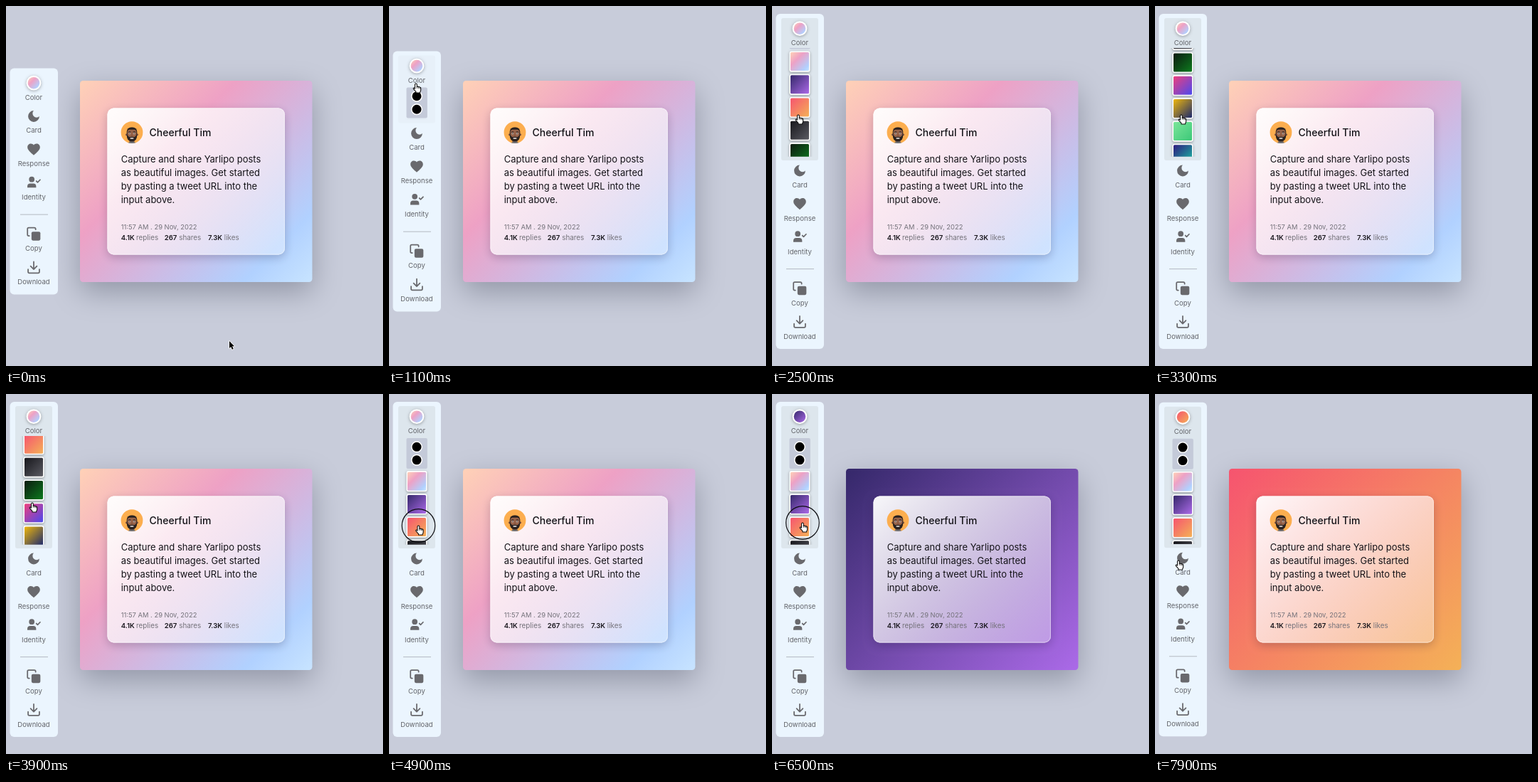
Recreate the animation shown at these times as an HTML page with a canvas. Size 530 by 506 pixels, loop 8 s.

```html
<!DOCTYPE html>
<html lang="en">
<head>
<meta charset="utf-8">
<title>Post card colour picker</title>
<style>
html, body { margin: 0; width: 100%; height: 100%; overflow: hidden; background: #c8ccda; }
canvas { display: block; width: 530px; height: 506px; }
</style>
</head>
<body>
<canvas id="stage"></canvas>
<script>
const W = 530, H = 506, LOOP = 8000, STEP = 100;
const canvas = document.getElementById('stage');
const ctx = canvas.getContext('2d');
const dpr = window.devicePixelRatio || 1;
canvas.width = W * dpr;
canvas.height = H * dpr;

const FONT = 'Inter, "Open Sans", sans-serif';
const ICON = '#69696d';
const PINK = ['#ffd1b7', 0, '#eea1c5', 0.36, '#b1d1ff', 0.84, '#c8e4ff', 1];
const PURPLE = ['#35286a', 0, '#ab6ae8', 1];
const ORANGE = ['#f6546f', 0, '#f4b157', 1];
const SWATCHES = [
  PINK, PURPLE, ORANGE,
  ['#17171c', 0, '#5a5a62', 1],
  ['#0c1a10', 0, '#0d7a1e', 1],
  ['#ee3f7c', 0, '#4b49ee', 1],
  ['#efb70c', 0, '#1d2a6c', 1],
  ['#7be59a', 0, '#3cc878', 1],
  ['#2f1a80', 0, '#19bfa2', 1],
  ['#f7d54a', 0, '#ef6b3a', 1]
];

// Pointer keys: time, x, y
const POINTER = [
  [0, 314, 471], [400, 38, 196], [550, 38, 196], [950, 38, 108], [1400, 38, 112],
  [1800, 37, 153], [4200, 37, 153], [4750, 41.5, 185], [5000, 41.5, 185],
  [5500, 40, 158], [5900, 40, 158], [6350, 43, 181], [6950, 43, 181],
  [7300, 36, 146], [7450, 36, 146], [7900, 33, 234]
];
const SCROLL = [[2100, 0], [3300, 172], [3500, 192], [3600, 192], [4300, 0]];
const CLICKS = [[4800, 5000], [5700, 5900], [6400, 6600]];

const paths = {
  moon: new Path2D('M12 3a6 6 0 0 0 9 9 9 9 0 1 1-9-9Z'),
  heart: new Path2D('M12 21.3L10.5 20C5.4 15.4 2 12.3 2 8.5 2 5.4 4.4 3 7.5 3c1.7 0 3.4.8 4.5 2.1C13.1 3.8 14.8 3 16.5 3 19.6 3 22 5.4 22 8.5c0 3.8-3.4 6.9-8.5 11.5Z'),
  bust: new Path2D('M4.4 6.8a4.4 4.4 0 1 1 8.8 0a4.4 4.4 0 1 1-8.8 0ZM1.8 20v-2a4.6 4.6 0 0 1 4.6-4.6h4.8a4.6 4.6 0 0 1 4.6 4.6v2Z'),
  check: new Path2D('M16.2 9.4l2 2 4-4'),
  copyBack: new Path2D('M5 15H4a2 2 0 0 1-2-2V4a2 2 0 0 1 2-2h9a2 2 0 0 1 2 2v1'),
  download: new Path2D('M21 15v4a2 2 0 0 1-2 2H5a2 2 0 0 1-2-2v-4M7 10l5 5 5-5M12 15V3'),
  arrow: new Path2D('M0 0V10L2.2 7.9L3.9 11.8L5.7 11L4.1 7.2H7.1Z'),
  hand: new Path2D('M-1.5 1Q0-1 1.3 1V4.6Q2.6 3.6 3.6 4.8Q4.8 4 5.3 5.2Q6.6 5 6.7 6.4V9Q6.5 11 5.6 12V13H0V11.6L-3.6 7.6Q-4.2 5.8-2.6 6.2L-1.5 7.2Z')
};

// Cubic bezier (.25, .1, .25, 1)
function ease(x) {
  if (x <= 0) return 0;
  if (x >= 1) return 1;
  let lo = 0, hi = 1;
  for (let i = 0; i < 24; i++) {
    const m = (lo + hi) / 2;
    if (0.75 * m * (1 - m) + m ** 3 < x) lo = m; else hi = m;
  }
  return 0.3 * lo * (1 - lo) ** 2 + 3 * lo * lo * (1 - lo) + lo ** 3;
}

function along(keys, t) {
  if (t <= keys[0][0]) return keys[0].slice(1);
  for (let i = 1; i < keys.length; i++) {
    const [a, ...from] = keys[i - 1], [b, ...to] = keys[i];
    if (t > b) continue;
    const u = (t - a) / (b - a), s = u * u * (3 - 2 * u);
    return from.map((v, n) => v + (to[n] - v) * s);
  }
  return keys[keys.length - 1].slice(1);
}

function box(x, y, w, h, r) {
  ctx.beginPath();
  ctx.roundRect(x, y, w, h, r);
}

function circle(x, y, r, fill) {
  ctx.beginPath();
  ctx.arc(x, y, r, 0, Math.PI * 2);
  ctx.fillStyle = fill;
  ctx.fill();
}

// Diagonal gradient at 135 degrees over a box
function diagonal(x, y, w, h, stops) {
  const cx = x + w / 2, cy = y + h / 2, d = (w + h) / 4;
  const g = ctx.createLinearGradient(cx - d, cy - d, cx + d, cy + d);
  for (let i = 0; i < stops.length; i += 2) g.addColorStop(stops[i + 1], stops[i]);
  return g;
}

function shadow(color, blur, dy) {
  ctx.shadowColor = color;
  ctx.shadowBlur = blur * dpr;
  ctx.shadowOffsetY = dy * dpr;
}

function text(str, x, y, size, color, weight = 400, align = 'left') {
  ctx.font = `${weight} ${size}px ${FONT}`;
  ctx.fillStyle = color;
  ctx.textAlign = align;
  ctx.fillText(str, x, y);
}

function at(x, y, draw) {
  ctx.save();
  ctx.translate(x, y);
  draw();
  ctx.restore();
}

// Icon on a 24 unit grid, centred in the sidebar
function icon(y, draw) {
  at(39, y, () => {
    ctx.scale(0.88, 0.88);
    ctx.translate(-12, -12);
    draw();
  });
}

function avatar() {
  circle(0, 0, 15.4, '#fcae4f');
  ctx.beginPath();
  ctx.arc(0, 0, 15.4, 0, Math.PI * 2);
  ctx.clip();
  ctx.translate(0, 0.8);
  ctx.scale(0.87, 0.9);
  ctx.fillStyle = '#77503d';
  ctx.fillRect(-4, 8, 8, 6);
  circle(0, 23, 10, '#6d7076');
  circle(-8.6, 2.6, 1.9, '#8c5b43');
  circle(8.6, 2.6, 1.9, '#8c5b43');
  ctx.fillStyle = '#29211f';
  box(-8.4, -9, 16.8, 14, [7, 7, 2, 2]);
  ctx.fill();
  ctx.fillStyle = '#97634a';
  box(-7.3, -5.2, 14.6, 16, [4, 4, 7, 7]);
  ctx.fill();
  ctx.fillStyle = '#29211f';
  ctx.fill(new Path2D('M-8.4 3L-7 3Q-6 6.8-3 6.2Q0 5.2 3 6.2Q6 6.8 7 3L8.4 3Q8.4 13.2 0 13.2Q-8.4 13.2-8.4 3Z'));
  ctx.fillRect(-5.8, -2.2, 4, 1.2);
  ctx.fillRect(1.8, -2.2, 4, 1.2);
  for (const x of [-3.6, 3.6]) {
    circle(x, 0.8, 1.3, '#eee6df');
    circle(x, 0.8, 0.9, '#29211f');
  }
  ctx.fillStyle = '#744632';
  ctx.fillRect(-1.3, 3.2, 2.6, 1);
  ctx.fillStyle = '#f4ece8';
  box(-2.8, 7.6, 5.6, 1.7, [0.4, 0.4, 1.4, 1.4]);
  ctx.fill();
}

function card(theme) {
  const [x, y, w, h] = [104, 105, 326.5, 283];
  ctx.save();
  shadow('rgba(40,45,65,.34)', 42, 14);
  ctx.fillStyle = diagonal(x, y, w, h, theme);
  box(x, y, w, h, 4.5);
  ctx.fill();
  ctx.restore();

  const inner = [142.5, 143.5, 249.5, 206];
  // Shadow only outside the translucent panel
  ctx.save();
  ctx.beginPath();
  ctx.rect(x, y, w, h);
  ctx.roundRect(...inner, 9);
  ctx.clip('evenodd');
  shadow('rgba(30,20,50,.24)', 13, 4);
  ctx.fillStyle = '#fff';
  box(...inner, 9);
  ctx.fill();
  ctx.restore();

  ctx.fillStyle = diagonal(...inner, ['rgba(255,255,255,.96)', 0, 'rgba(255,255,255,.36)', 1]);
  box(...inner, 9);
  ctx.fill();
  ctx.strokeStyle = 'rgba(255,255,255,.42)';
  ctx.lineWidth = 1;
  box(143, 144, 248.5, 205, 8.5);
  ctx.stroke();

  at(177, 177.7, avatar);
  text('Cheerful Tim', 201.5, 183, 14, '#141318', 500);
  [
    'Capture and share Yarlipo posts',
    'as beautiful images. Get started',
    'by pasting a tweet URL into the',
    'input above.'
  ].forEach((line, i) => text(line, 161.7, 219.5 + i * 19.2, 13, '#141318'));
  text('11:57 AM . 29 Nov, 2022', 161.7, 313.6, 9.4, '#74727a');
  [['4.1K', 'replies', 161.7, 183], ['267', 'shares', 222.7, 243.2], ['7.3K', 'likes', 284, 306.8]]
    .forEach(([num, label, nx, lx]) => {
      text(num, nx, 329, 9.6, '#18161c', 600);
      text(label, lx, 329, 9.9, '#74727a');
    });
}

function swatch(y, stops) {
  ctx.save();
  shadow('rgba(0,0,0,.38)', 3.5, 1);
  ctx.fillStyle = '#fff';
  box(24.4, y - 14.6, 29.2, 29.2, 3);
  ctx.fill();
  ctx.restore();
  ctx.fillStyle = diagonal(26, y - 13, 26, 26, stops);
  box(26, y - 13, 26, 26, 1.5);
  ctx.fill();
}

function swatchList(top, open, scroll) {
  ctx.save();
  ctx.beginPath();
  ctx.rect(13, top + 48, 52, 153 * open - 0.2);
  ctx.clip();
  const y0 = top - scroll;
  ctx.fillStyle = '#c4cad9';
  box(24.5, y0 + 51, 29.4, 43, 2);
  ctx.fill();
  for (const dy of [63.3, 81.8]) {
    circle(39, y0 + dy, 8, '#fff');
    circle(39, y0 + dy, 6.5, '#000');
  }
  SWATCHES.forEach((stops, i) => swatch(y0 + 111.7 + i * 32.2, stops));
  ctx.restore();
}

function sidebar(theme, open, scroll) {
  const top = 87.5 - 76.5 * open, low = 76.5 * open;
  ctx.fillStyle = '#ebf5fe';
  box(5.5, top, 67.5, 318 + 153 * open, 6);
  ctx.fill();

  if (open > 0) {
    ctx.globalAlpha = open;
    ctx.fillStyle = '#dde6ed';
    box(13, top + 6, 52, 47 + 153 * open, 3);
    ctx.fill();
    ctx.globalAlpha = 1;
    swatchList(top, open, scroll);
  }

  const dotY = top + 20.7;
  ctx.save();
  shadow('rgba(0,0,0,.32)', 4, 1);
  circle(39, dotY, 10.4, '#fff');
  ctx.restore();
  circle(39, dotY, 8.3, diagonal(30.7, dotY - 8.3, 16.6, 16.6, theme));

  const label = (str, y) => text(str, 39, y, 9.6, '#63656a', 400, 'center');
  label('Color', top + 44.4);

  at(0, low, () => {
    label('Card', 178.4);
    label('Response', 225.2);
    label('Identity', 272);
    label('Copy', 344.4);
    label('Download', 391);

    ctx.fillStyle = ctx.strokeStyle = ICON;
    ctx.lineCap = ctx.lineJoin = 'round';
    ctx.lineWidth = 2;
    icon(155, () => ctx.fill(paths.moon));
    icon(201.5, () => ctx.fill(paths.heart));
    icon(248.3, () => { ctx.fill(paths.bust); ctx.stroke(paths.check); });
    icon(320.4, () => {
      ctx.stroke(paths.copyBack);
      box(8.4, 8.4, 14.2, 14.2, 2.4);
      ctx.fill();
    });
    icon(367.4, () => ctx.stroke(paths.download));
    ctx.fillStyle = '#b4bac1';
    ctx.fillRect(20, 292.6, 39, 1);
  });
}

function pointer(t) {
  const [x, y] = along(POINTER, t);
  if (CLICKS.some(([a, b]) => t >= a && t < b)) {
    ctx.beginPath();
    ctx.arc(x, y, 23.3, 0, Math.PI * 2);
    ctx.strokeStyle = '#0c0c10';
    ctx.lineWidth = 1.2;
    ctx.stroke();
  }
  const hover = x < 65;
  at(x, y, () => {
    ctx.lineJoin = 'round';
    ctx.lineWidth = hover ? 1.1 : 1.6;
    ctx.strokeStyle = hover ? '#111' : '#fff';
    ctx.fillStyle = hover ? '#fff' : '#000';
    const shape = hover ? paths.hand : paths.arrow;
    if (hover) {
      ctx.fill(shape);
      ctx.stroke(shape);
      ctx.lineWidth = 0.7;
      ctx.stroke(new Path2D('M1.3 4.6V7M3.6 5V7.2M5.3 5.4V7.4'));
    } else {
      ctx.stroke(shape);
      ctx.fill(shape);
    }
  });
}

function themeAt(t) {
  if (t < 5000) return PINK;
  return t >= 5900 && t < 6600 ? PURPLE : ORANGE;
}

function render(t) {
  ctx.setTransform(dpr, 0, 0, dpr, 0, 0);
  ctx.fillStyle = '#c8ccda';
  ctx.fillRect(0, 0, W, H);
  const open = ease((t - 1000) / 480) - ease((t - 7890) / 480);
  const theme = themeAt(t);
  card(theme);
  sidebar(theme, open, along(SCROLL, t)[0]);
  pointer(t);
}

const start = performance.now();
function tick() {
  const t = (performance.now() - start) % LOOP;
  render(Math.floor(t / STEP) * STEP);
  requestAnimationFrame(tick);
}
tick();
</script>
</body>
</html>
```
